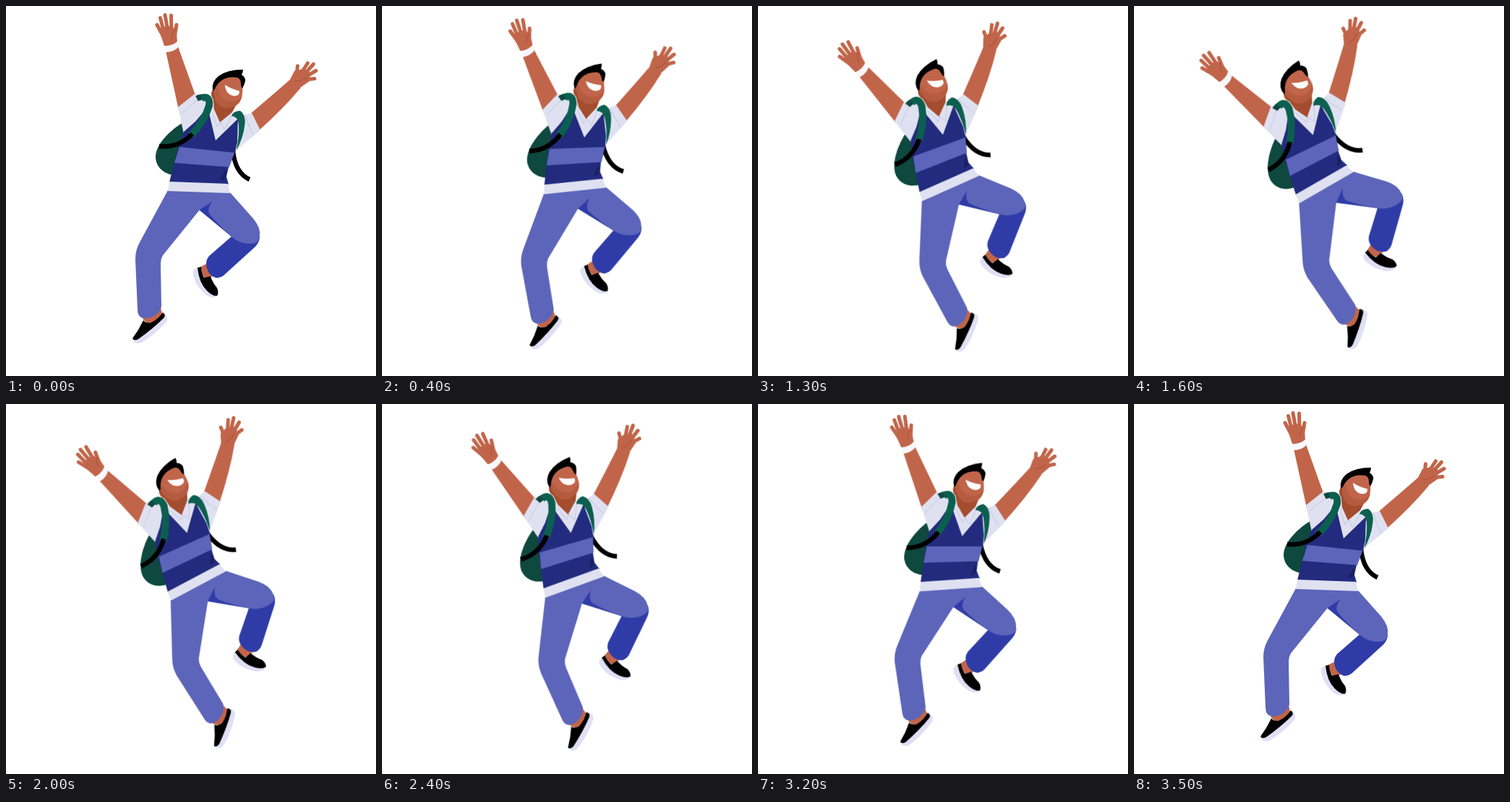
Write an HTML page that moves like this. It is 512 px wide and 512 px high and loops after 3600 ms.

```html
<!DOCTYPE html>
<html lang="en">
<head>
<meta charset="utf-8">
<title>Jumping student</title>
<style>
  html, body { margin: 0; width: 100%; height: 100%; overflow: hidden; background: #fff; }
  svg { display: block; width: 100vw; height: 100vh; }

  /* The whole figure rocks around the stage centre, 18 poses each way. */
  #figure {
    transform-box: view-box;
    transform-origin: 256px 256px;
    animation: rock 3600ms infinite;
  }
  @keyframes rock {
    0%   { transform: rotate(0deg);    animation-timing-function: steps(18, jump-none); }
    50%  { transform: rotate(-34deg);  animation-timing-function: steps(18, jump-none); }
    100% { transform: rotate(0deg); }
  }

  .skin { fill: #c1654a; }
  .shade { fill: #a44c2e; }
  .shirt { fill: #dfe1f1; }
  .navy { fill: #222b7e; }
  .pants { fill: #5c65b9; }
  .dark-pants { fill: #2f3ca8; }
  .bag { fill: #0e483f; }
  .strap { fill: #0c5f4f; }
  .sole { fill: #dfe0f4; }
  .line { fill: none; stroke-linecap: round; stroke-linejoin: round; }
  .fingers { stroke: #c1654a; stroke-width: 5; }
  .crease { stroke: #a04a35; stroke-width: 0.9; }
  .fold { stroke: #c3c6e2; stroke-width: 1; }
  .strap-line { stroke: #0c5f4f; stroke-width: 10; stroke-linecap: butt; }
  .strap-back { stroke: #0e483f; stroke-width: 8; stroke-linecap: butt; }
  .webbing { stroke: #000; stroke-width: 6.4; stroke-linecap: butt; }
</style>
</head>
<body>
<svg viewBox="0 0 512 512">
  <g id="figure">
    <!-- backpack -->
    <path class="bag" d="M247 160C228 171 208 190 207 208C207 222 217 232 232 234L250 190Z"/>
    <path class="line webbing" d="M314 200Q317 231 337 240"/>

    <!-- left arm -->
    <g>
      <path class="skin" d="M221 62L239 144L263 126L238 56Z"/>
      <path class="skin" d="M214 40L219 55Q229 56 237 50L236 36L230 27L217 29Z"/>
      <path class="line fingers" d="M217 41L209 26M218 34L213.5 16.5M223.5 32L220 12.5M229 34L228.5 13M233.5 41L236 26"/>
      <path class="line crease" d="M229 45Q230 38 234 33"/>
      <path fill="#f8f7fc" d="M219 55Q230 56 237 49L239.5 56Q232 64 221 64Z"/>
    </g>

    <!-- right arm -->
    <g>
      <path class="skin" d="M336 151L371 121L394 101L408 113Q384 142 348 174Z"/>
      <path class="skin" d="M393 102L399 90L411 87L421 92L420 104L407 113Z"/>
      <path class="line fingers" d="M402 96L403.5 83M409 92L417.5 79M414 93L425.5 80.5M416 97L429 89.5M414 102L427 100.5"/>
      <path class="line crease" d="M400 104Q408 105 416 99"/>
    </g>

    <!-- feet -->
    <path class="skin" d="M189 433L213 413L217 429L199 442Z"/>
    <path class="sole" d="M219 425Q226 431 222 437Q205 456 187 466Q178 469 175 461Z"/>
    <path d="M190 435Q195 440 201 438Q211 433 217 424Q222 428 218 432Q204 446 183 461Q177 464 175 460Q184 448 190 435Z"/>
    <path class="skin" d="M269 361L279 356L287 374L272 378Z"/>
    <path class="sole" d="M265 362Q257 364 259 373Q263 389 277 400Q288 406 293 401Z"/>
    <path d="M265 362L270 361Q270 369 274 376L283 374Q286 383 292 390Q295 397 292 401Q286 402 278 394Q267 383 265 362Z"/>

    <!-- legs -->
    <path class="dark-pants" d="M312 319L281 346Q275 353 278 363Q281 373 290 376Q296 377 301 373L345 333Q352 326 351 316L335 312Z"/>
    <path class="dark-pants" d="M267 282L284 262L300 280L313 320Z"/>
    <path class="pants" d="M224 255L310 258L342 294Q353 307 351 319Q350 326 345 328Q326 332 312 319Q293 302 281 287Q278 280 286 270L268 282L217 345Q214 350 214 356L215 416Q213 424 203 430Q193 434 187 431Q182 428 182 420L179 350Q179 338 185 327Z"/>

    <!-- sleeves and collar -->
    <path class="shirt" d="M238 140L262 121L282 130L282 148L246 177Z"/>
    <path class="line fold" d="M243 148L269 127"/>
    <path class="shirt" d="M318 156L331 150L340 148L352 172L319 199Z"/>
    <path class="line fold" d="M331 151Q335 166 342 178"/>
    <path class="shirt" d="M276 138L284 130L297 155L313 146L323 154L291 190Z"/>

    <!-- vest -->
    <path class="navy" d="M279 140L290 186L321 156L320 188L317 203L308 223L305 236L308 247L226 244L238 196L246 174L262 160Z"/>
    <path class="pants" d="M240 195L316 203L309 223L233 217Z"/>
    <path fill="#1a1f5e" d="M304 227L296 240Q302 243 305 234Z"/>
    <path class="shirt" d="M226 243L307 246L310 259L224 256Z"/>

    <!-- head -->
    <path class="shade" d="M286 122L288 143L296 161L313 147L319 136Z"/>
    <path class="line fold" d="M286 148L292 167L297 161L302 171L312 153"/>
    <ellipse class="shade" cx="290" cy="122" rx="6" ry="8"/>
    <path class="skin" d="M288 116Q292 96 312 95L326 100Q328 112 327 122Q326 133 318 138Q307 144 297 139Q287 132 288 116Z"/>
    <path class="shade" d="M288 117Q287 134 298 140Q309 144 319 137Q325 132 327 124Q320 134 308 132Q294 128 293 112Z" opacity=".4"/>
    <path d="M286 117Q284 105 294 97Q306 88 328 88Q328 92 326 95Q332 99 331 104Q330 109 327 114Q325 112 325 107Q325 101 320 99Q306 97 297 104Q292 108 289 115Z"/>
    <path fill="#fff" d="M303 109Q312 115 323 117.5Q323.5 124.5 316 124.5Q304 123 303 109Z"/>

    <!-- straps -->
    <path class="line strap-back" d="M264 128Q272 124 280 128"/>
    <path class="line strap-line" d="M271 127Q283 124 281 138Q275 159 256 179"/>
    <path class="line webbing" d="M258 177Q238 197 212 194"/>
    <path class="strap" d="M312 152Q315 145 324 145Q332 150 330.5 164Q328 184 318.5 200Q323 180 322 164Q321 153 312 152Z"/>
  </g>
</svg>
</body>
</html>
```
